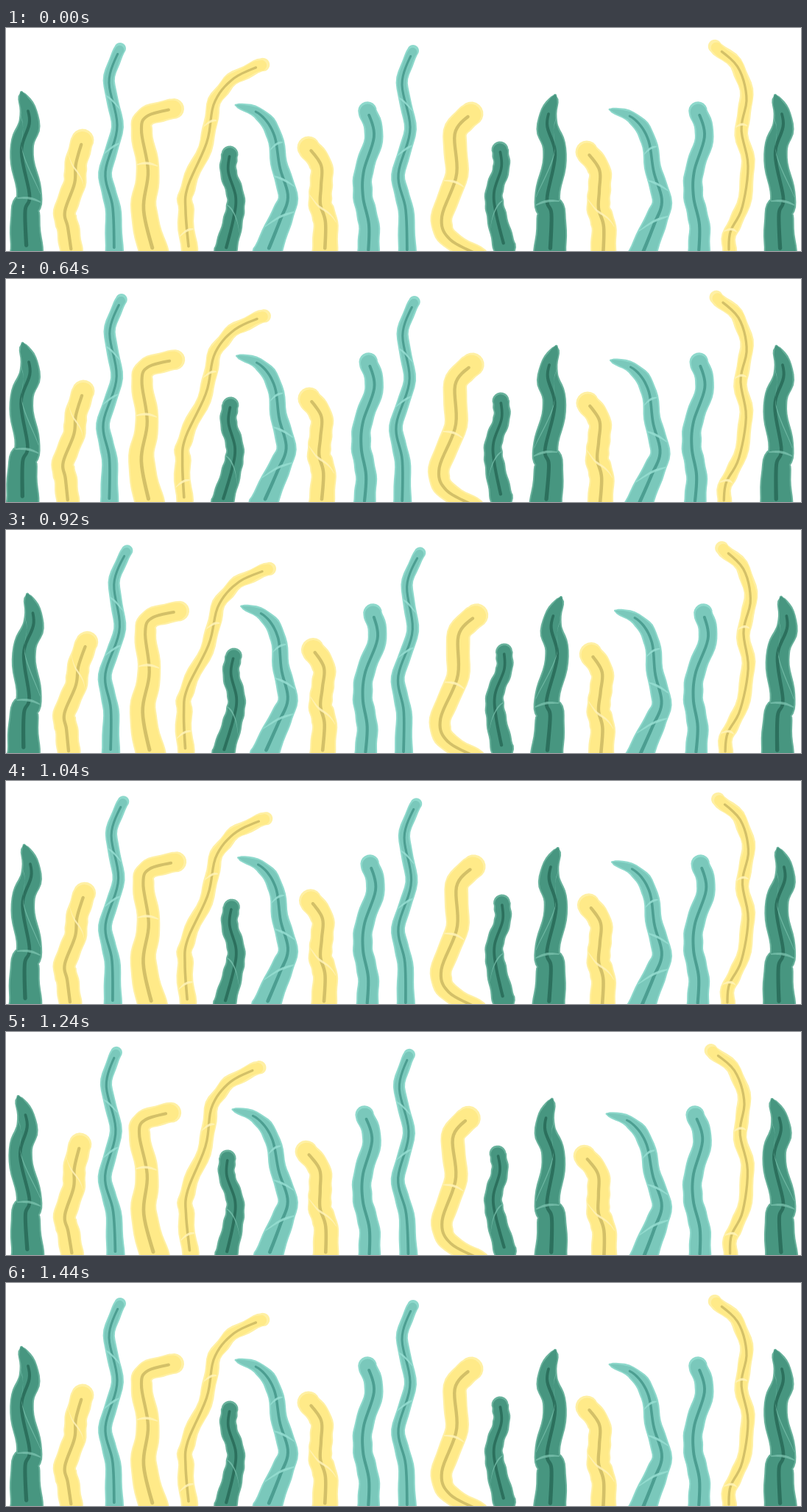
These frames come from a looping animation (1080 by 304 pixels, 1960 ms). An HTML page with a canvas:

```html
<!DOCTYPE html>
<html lang="en">
<head>
<meta charset="utf-8">
<title>Swaying seaweed</title>
<style>
  html, body { margin: 0; width: 100%; height: 100%; overflow: hidden; background: #fff; }
  canvas { display: block; width: 1080px; height: 304px; }
</style>
</head>
<body>
<canvas id="stage" width="1080" height="304"></canvas>
<script>
const WIDTH = 1080, GROUND = 304;
const LOOP = 1960, START = 520, STEP = 40, LAST = 23;
const ctx = document.getElementById('stage').getContext('2d');

const DARK = { edge: '#69b29c', body: '#479680', vein: '#2c705d', band: 'rgba(121,193,172,.8)' };
const TEAL = { edge: '#8ed9cc', body: '#7ac8bb', vein: '#4c9e91', band: 'rgba(151,222,210,.85)' };
const YELLOW = { edge: '#fff0a4', body: '#ffea88', vein: '#d3c068', band: 'rgba(255,243,184,.85)' };

// A kind of weed: key points of its stem from tip to foot, half width at both ends,
// and bands that cross from its left side to its right side between two stem fractions.
const tallDark = {
  colors: DARK, tip: 15.5, foot: 23, taper: 0.25, bands: [[0.15, 0.62], [0.64, 0.64]],
  stem: [[21, 88], [32, 126], [21, 168], [32, 228], [26, 250], [28, 304]]
};
const shortDark = {
  colors: DARK, tip: 11.5, foot: 16, bands: [[0.6, 0.85]],
  stem: [[304, 172], [302, 196], [312, 230], [309, 260], [298, 304]]
};
const thinTeal = {
  colors: TEAL, tip: 8, foot: 13, bands: [[0.26, 0.33], [0.52, 0.46]],
  stem: [[155, 28], [140, 72], [151, 135], [135, 197], [145, 245], [147, 308]]
};
const midTeal = {
  colors: TEAL, tip: 12.8, foot: 15.5, bands: [],
  stem: [[491, 113], [500, 147], [486, 195], [485, 230], [493, 268], [492, 308]]
};
const hookTeal = {
  colors: TEAL, tip: 10, foot: 20, taper: 0.25, bands: [[0.41, 0.38], [0.53, 0.62], [0.88, 0.74]],
  stem: [[312, 105], [344, 117], [364, 145], [372, 190], [383, 230], [372, 263], [354, 308]]
};
const leftYellow = {
  colors: YELLOW, tip: 15.5, foot: 16, bands: [[0.13, 0.42]],
  stem: [[104, 153], [95, 185], [93, 212], [80, 250], [84, 272], [89, 306]]
};
const rightYellow = {
  colors: YELLOW, tip: 15.5, foot: 18, bands: [[0.5, 0.82]],
  stem: [[411, 163], [428, 187], [428, 215], [427, 240], [434, 265], [433, 306]]
};
const hookYellow = {
  colors: YELLOW, tip: 14, foot: 21, bands: [[0.56, 0.58]],
  stem: [[228, 110], [192, 120], [184, 140], [193, 195], [187, 248], [201, 308]]
};
const bentYellow = {
  colors: YELLOW, tip: 16.5, foot: 11, bands: [[0.44, 0.44]],
  stem: [[632, 117], [610, 143], [612, 200], [592, 258], [603, 288], [644, 310]]
};
const longYellow = {
  colors: YELLOW, tip: 9.3, foot: 12, lumps: 1.2, bands: [[0.44, 0.41], [0.92, 0.9]],
  stem: [[349, 50], [309, 69], [283, 102], [273, 155], [247, 216], [244, 250], [249, 308]]
};
const archYellow = {
  colors: YELLOW, tip: 9.3, foot: 10, lumps: 1.2, bands: [[0.42, 0.41], [0.86, 0.84]],
  stem: [[963, 25], [994, 53], [1006, 95], [999, 138], [1008, 188], [1000, 245], [984, 278], [982, 308]]
};

const mix = (a, b, t) => a + (b - a) * t;
const clamp = t => Math.min(Math.max(t, 0), 1);
const smooth = t => (1 - Math.cos(Math.PI * t)) / 2;

function catmull(a, b, c, d, t) {
  return b + t / 2 * (c - a + t * (2 * a - 5 * b + 4 * c - d + t * (3 * (b - c) + d - a)));
}

// Position on the stem at fraction s, with its unit normal and half width
function along({ stem, tip, foot, taper = 0 }, s) {
  const at = f => {
    const pos = clamp(f) * (stem.length - 1), i = Math.min(Math.floor(pos), stem.length - 2);
    const knot = k => stem[Math.min(Math.max(k, 0), stem.length - 1)];
    return [0, 1].map(axis =>
      catmull(...[-1, 0, 1, 2].map(k => knot(i + k)[axis]), pos - i));
  };
  const [x, y] = at(s), [x0, y0] = at(s - 0.01), [x1, y1] = at(s + 0.01);
  const length = Math.hypot(x1 - x0, y1 - y0);
  const point = taper ? Math.sqrt(clamp(s / taper) + 0.02) : 1;
  return { x, y, nx: (y1 - y0) / length, ny: (x0 - x1) / length,
           w: Math.min(point, 1) * mix(tip, foot, s ** 2.5) };
}

// Ribbon that follows the stem between two fractions; side and half give its place and width
function ribbon(kind, from, to, half, side = () => 0) {
  const steps = 40, left = [], right = [], caps = [[], []];
  for (let i = 0; i <= steps; i++) {
    const t = i / steps, p = along(kind, mix(from, to, t));
    const offset = side(t) * p.w, r = half(p.w);
    const wave = (kind.lumps ?? 0.5) * Math.sin(i * 1.1) * (r > 5);
    left.push([p.x + p.nx * (offset - r - wave), p.y + p.ny * (offset - r - wave)]);
    right.push([p.x + p.nx * (offset + r - wave), p.y + p.ny * (offset + r - wave)]);
    if (i % steps === 0) {
      const out = i ? 1 : -1;
      for (let a = 0.1; a < 1; a += 0.1) {
        const across = offset - out * r * Math.cos(a * Math.PI), ahead = out * r * Math.sin(a * Math.PI);
        caps[i / steps].push([p.x + p.nx * across - p.ny * ahead, p.y + p.ny * across + p.nx * ahead]);
      }
    }
  }
  return [...left, ...caps[1], ...right.reverse(), ...caps[0]];
}

// Line that crosses the weed, bowed like the rim of a fold
function crossing(kind, from, to) {
  const points = [];
  for (let t = 0; t <= 1; t += 0.05) {
    const p = along(kind, mix(from, to, t)), offset = (t * 2 - 1) * (p.w - 1);
    const bow = Math.sin(t * Math.PI) * -4;
    points.push([p.x + p.nx * offset - p.ny * bow, p.y + p.ny * offset + p.nx * bow]);
  }
  const lower = points.map(([x, y], i) => [x, y + 1.5 + 2 * Math.sin(i / 20 * Math.PI)]);
  return [...points, ...lower.reverse()];
}

function plant(kind, dx = 0, dy = 0, flip = 1) {
  const { edge, body, vein, band } = kind.colors;
  const layers = [
    [edge, ribbon(kind, 0, 1, w => w)],
    [body, ribbon(kind, 0.015, 1, w => Math.max(w - 2, 0.5))],
    [vein, ribbon(kind, kind.taper ? 0.14 : 0.05, 0.96, w => 0.9 + w * 0.08)],
    ...kind.bands.map(([from, to]) => [band, crossing(kind, from, to)])
  ].map(([color, points]) => [color, points.map(([x, y]) => [x * flip + dx, y + dy])]);
  const top = Math.min(...layers[0][1].map(p => p[1]));
  return { layers, top, foot: kind.stem.at(-1)[0] * flip + dx };
}

const garden = [
  plant(tallDark), plant(leftYellow), plant(thinTeal), plant(hookYellow), plant(longYellow),
  plant(shortDark), plant(hookTeal), plant(rightYellow), plant(midTeal), plant(thinTeal, 398, 3),
  plant(bentYellow), plant(shortDark, 975, -6, -1), plant(tallDark, 767, 4, -1),
  plant(rightYellow, 378, 6), plant(hookTeal, 508, 6), plant(midTeal, 449),
  plant(archYellow), plant(tallDark, 1024, 4)
];

// Quick swing to a peak, slow rebound, then back to rest
function swing(step, start, turn, peak, rebound) {
  const back = 20;
  if (step < turn) return mix(start, peak, Math.sin(step / turn * Math.PI / 2));
  if (step < back) return mix(peak, rebound, smooth((step - turn) / (back - turn)));
  return mix(rebound, 0, (step - back) / (LAST - back));
}

function draw(step) {
  const tipSwing = swing(step, -9.5, 8, 11, -6.5);
  const footSwing = swing(step, 8.5, 4, -8, 2);
  ctx.fillStyle = '#fff';
  ctx.fillRect(0, 0, WIDTH, GROUND);
  for (const { layers, top, foot } of garden) {
    const height = GROUND - top, reach = (height / 285) ** 0.7;
    const tilt = tipSwing * reach * 0.0033;
    for (const [color, points] of layers) {
      ctx.beginPath();
      for (const [x, y] of points) {
        const u = clamp((GROUND - y) / height);
        const shift = reach * (tipSwing * u ** 1.5 + footSwing * (1 - u) ** 1.5);
        ctx.lineTo(x + shift, y + (x - foot) * tilt * u);
      }
      ctx.fillStyle = color;
      ctx.fill();
    }
  }
}

let shown = -1;
function tick() {
  const step = Math.floor((performance.now() % LOOP - START) / STEP);
  const pose = step < 0 || step > LAST ? LAST : step;
  if (pose !== shown) draw(shown = pose);
  requestAnimationFrame(tick);
}
tick();
</script>
</body>
</html>
```
